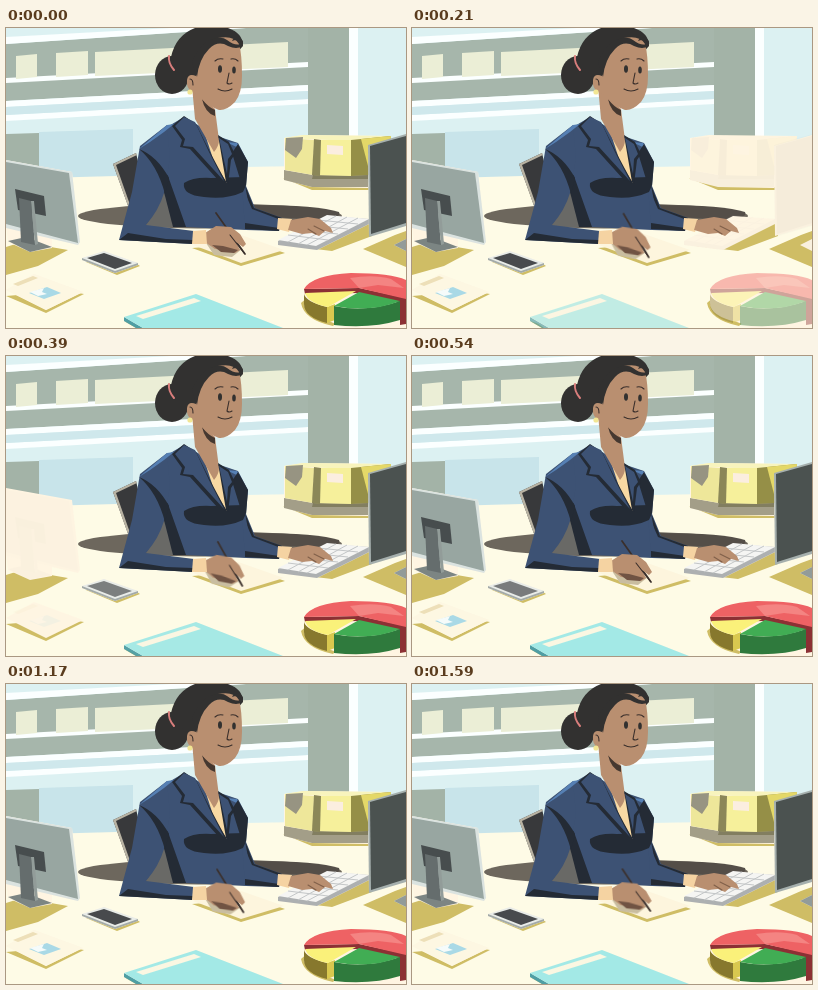
An HTML page for the animation above (1620 ms loop, 400 by 300 pixels).

```html
<!DOCTYPE html>
<html lang="en">
<head>
<meta charset="utf-8">
<title>At the desk</title>
<style>
  html, body { margin: 0; width: 100%; height: 100%; overflow: hidden; background: #fefbe6; }
  svg { display: block; width: 100vw; height: 100vh; }

  /* each desk object pales to cream once per loop, from right to left */
  .fade { animation: fade 1620ms linear var(--at) infinite; }
  @keyframes fade {
    0%, 13.58%, 100% { opacity: 1; }
    6.79% { opacity: 0; }
  }

  .write { transform-origin: 202px 203px; animation: write 270ms infinite; }
  @keyframes write {
    0%, 11.1% { transform: rotate(0deg); animation-timing-function: ease-in-out; }
    55.6%, 66.7% { transform: rotate(7deg); animation-timing-function: ease-in-out; }
    100% { transform: rotate(0deg); }
  }

  .cream { fill: #fff5e2; }
  .shade { fill: #cfbd65; }
  .navy { fill: #3d5274; }
  .ink { fill: #242b35; }
  .skin { fill: #b98f70; }
  .hair { fill: #323130; }
  .line { fill: none; stroke: #3a2f2b; stroke-width: 1.1; stroke-linecap: round; }
</style>
</head>
<body>
<svg viewBox="0 0 400 300" preserveAspectRatio="none">
  <g id="room">
    <path fill="#dcf1f2" d="M0 0H400V160H0Z"/>
    <path fill="#a6b6ab" d="M0 16 240 0H302V57L0 73Z"/>
    <path fill="#fbffff" d="M0 9 165 0H240L0 16ZM0 50 302 34V39L0 55Z"/>
    <path fill="#fbffff" d="M0 73 302 57V63L0 79ZM0 87 302 71V76L0 93Z"/>
    <path fill="#cfe8ec" d="M0 79 302 63V71L0 87Z"/>
    <path fill="#ebeed6" d="M10 28 31 26V49L10 51ZM50 25 82 23V47L50 49ZM89 24 282 14V39L89 48Z"/>
    <path fill="#a3b3a7" d="M0 106 33 105V150H0Z"/>
    <path fill="#c8e4ea" d="M33 104 127 101V152H33Z"/>
    <path fill="#a3b3a7" d="M302 0H343V112H302Z"/>
    <path fill="#fbffff" d="M343 0H352V112H343Z"/>
  </g>

  <path fill="#fefbe6" d="M0 151 110 148 240 139 400 136V300H0Z"/>
  <ellipse cx="204" cy="188" rx="132" ry="12.5" fill="#6d675d"/>
  <path fill="#544e48" d="M230 177Q310 176 333 184Q336 190 316 192L230 187Z"/>

  <g id="shadows" class="shade">
    <path d="M0 219 16 214 62 222 32 238 0 247Z"/>
    <path d="M0 268 40 285 78 266 60 263Z"/>
    <path d="M186 220 235 238 279 225 250 215Z"/>
    <path d="M284 218 326 223 366 208V193L311 219Z"/>
    <path d="M357 221 389 207 400 203V239Z"/>
    <path d="M277 150 306 162 364 162 369 155Z"/>
    <path d="M295 275Q298 292 327 298L340 285 310 262Z"/>
  </g>

  <g id="boxes">
    <path class="cream" d="M278 110 297 107 385 108 383 143 362 160 306 159 278 152Z"/>
    <g class="fade" style="--at:108ms">
      <path fill="#a39e88" d="M278 142 307 147 362 147V159L306 159 278 152Z"/>
      <path fill="#827e60" d="M307 147 345 148 362 147V151L306 151Z"/>
      <path fill="#f8f4bd" d="M278 110 297 107 385 108 345 113Z"/>
      <path fill="#eee79a" d="M279 110 308 112 307 147 279 142Z"/>
      <path fill="#f6f09b" d="M308 112 345 112V148L307 147Z"/>
      <path fill="#958f47" d="M345 112 385 108 383 143 362 147 345 148Z"/>
      <path fill="#e4d868" d="M355 111 385 108 383 135 362 138Z"/>
      <path fill="#8b8758" d="M308 111 315 112 314 148 306 147Z"/>
      <path fill="#979482" d="M280 110 297 109 296 121 290 130 279 122Z"/>
      <path fill="#fbeee0" d="M321 117 337 118V127L321 126Z"/>
    </g>
  </g>

  <g id="chair">
    <path fill="#38393b" d="M107 136 130 125 146 192 130 200Q120 172 107 136Z"/>
    <path fill="#b9b3a3" d="M107 136 130 125 131 127 110 137 129 191 127 192Q117 164 107 136Z"/>
  </g>

  <g id="woman">
    <path fill="#696966" d="M159 160 170 199 139 200Z"/>
    <path class="ink" d="M152 138 172 140 184 199 167 199 158 164Z"/>
    <path class="navy" d="M161 99 178 89 211 108 232 115 242 134 240 158 249 180 276 190 273 203 240 202 180 199 162 148 140 118Z"/>
    <path class="navy" d="M161 97 134 118 126 164 113 212 187 216 188 203 140 197Q153 182 158 165L164 130Z"/>
    <path fill="#5680b4" d="M133 121 161 97 168 96 158 104 144 114ZM220 114 231 115 235 121Z"/>
    <path class="ink" d="M133 121Q151 128 163 150L159 166Q151 136 133 121Z"/>
    <path class="ink" d="M113 212 122 205 160 211 187 212V216ZM232 116 242 134 240 158 234 151 226 125ZM239 157 248 180 276 190 275 194 244 184Z"/>
    <path class="navy" d="M236 158 246 181 275 192 273 203 239 200Z"/>
    <path class="ink" d="M239 195 273 200V203L239 201ZM178 155Q187 149 205 150L238 149Q242 155 237 164Q220 172 198 169Q176 167 178 155Z"/>
    <path fill="#f8d9a3" d="M199 106 213 110 219 122 221 155 208 134Z"/>
    <path class="skin" d="M186 58 189 91 200 110 208 124Q213 118 213 112L209 81Z"/>
    <path fill="#453830" d="M196 71Q202 79 209 82L209 88Q199 85 196 71Z"/>
    <path class="ink" d="M178 88 166 98 176 112 174 119 184 121 212 152 221 156 205 126 190 96Z"/>
    <path class="navy" d="M178 89 169 98 179 111 177 118 187 119 218 153 203 124 189 94Z"/>
    <path class="ink" d="M212 107 223 114 229 126 225 132 222 156 220 154Z"/>
    <path class="navy" d="M213 110 222 116 226 126 222 131 221 146Z"/>

    <ellipse class="hair" cx="166" cy="47" rx="17" ry="19"/>
    <path class="hair" d="M165 29Q170 7 189 0H222Q237 5 237 18L204 55 186 57Q176 44 165 29Z"/>
    <path class="skin" d="M192 40Q198 17 212 10Q228 7 233 16Q236 26 236 48Q236 65 229 74Q220 83 213 82Q202 78 193 68L186 64Q180 60 181 52Q182 45 190 48Z"/>
    <path class="hair" d="M186 34Q196 12 207 11Q216 8 221 12Q229 18 234 16Q236 13 231 12Q228 12 226 13Q228 8 234 10Q239 13 236 18Q231 22 222 18Q212 12 203 21Q193 31 191 49Z"/>
    <path class="line" style="stroke:#d97e7c;stroke-width:2" d="M163 28Q162 35 168 42"/>
    <path class="line" d="M184 51Q187 51 187 57M209 33Q212 30 217 31M225 31Q229 30 232 33M223 45 221 55Q223 57 226 55M212 61Q219 65 226 61"/>
    <g class="hair">
      <ellipse cx="214" cy="41" rx="2" ry="3.7"/>
      <ellipse cx="228" cy="42" rx="1.8" ry="3.6"/>
    </g>
    <circle cx="184" cy="64" r="2.6" fill="#f2e693"/>
  </g>

  <g id="keyboard">
    <path class="cream" d="M272 213 321 188 363 191V196L311 222 272 217Z"/>
    <g class="fade" style="--at:95ms">
      <path fill="#adb0b1" d="M272 213 321 188 363 191V196L311 222 272 217Z"/>
      <path fill="#f5f5f3" d="M272 212 321 187 363 191 310 218Z"/>
      <path fill="none" stroke="#c3c6c7" d="M282 207 322 212M292 202 332 206M302 197 342 201M312 192 352 196M282 214 330 188M292 216 341 189M301 217 352 190"/>
    </g>
  </g>
  <path fill="#f5d3a2" d="M272 190 286 191 283 204 271 201Z"/>
  <path class="skin" d="M285 192 302 189 314 191 325 200 327 205 319 203 313 208 306 205 296 206 282 202Z"/>
  <path class="line" style="stroke:#80604a" d="M308 198 318 203M302 201 310 206"/>

  <path fill="#fdf5dd" d="M187 217 218 201 278 222 235 235Z"/>
  <g class="write">
    <path fill="#c9bda0" d="M200 215 236 221 226 229 208 227Z"/>
    <path class="line" style="stroke-width:1.7" d="M210 185 239 226"/>
    <path class="skin" d="M199 205 210 198 225 199 234 206 240 216 237 219 230 214 234 222 229 225 219 222 209 221 199 214Z"/>
    <path fill="#705343" d="M206 217 217 218 232 222 228 225 215 224Z"/>
    <path class="line" d="M224 207 238 225"/>
  </g>
  <path fill="#f5d3a2" d="M187 203 200 202 201 216 186 216Z"/>

  <g id="screen-right">
    <path class="cream" d="M362 118 400 107V197L363 208ZM388 217 400 211V223Z"/>
    <g class="fade" style="--at:95ms">
      <path fill="#a5afad" d="M362 117 400 106V198L363 209Z"/>
      <path fill="#4b5250" d="M364 118 400 108V195L365 206Z"/>
      <path fill="#929b99" d="M388 217 400 211V223Z"/>
    </g>
  </g>

  <g id="screen-left">
    <path class="cream" d="M0 132 66 144 74 214 72 217 46 211V220L24 224 2 214 0 196Z"/>
    <g class="fade" style="--at:278ms">
      <path fill="#dbe3e0" d="M0 132 66 144 74 214 72 217 0 200Z"/>
      <path fill="#98a6a1" d="M0 134 63 145 72 215 0 196Z"/>
      <path fill="#7c8583" d="M2 213 20 209 46 219 24 224Z"/>
      <path fill="#474d4e" d="M9 161 38 168 40 188 12 182Z"/>
      <path fill="#656d6d" d="M13 170 25 173 29 217 15 214Z"/>
      <path fill="#929c99" d="M25 173 28 173 32 216 29 217Z"/>
    </g>
  </g>

  <g id="letter">
    <path class="cream" d="M0 262 28 246 77 264 40 282Z"/>
    <g class="fade" style="--at:295ms">
      <path fill="#fdf7e2" d="M0 262 28 246 77 264 40 282Z"/>
      <path fill="#eddfb8" d="M7 256 27 248 32 250 12 258Z"/>
      <path fill="#a9d9e6" d="M23 265 41 259 55 265 38 271Z"/>
      <path fill="#f5fbfa" d="M24 264 38 260 36 264 41 266 32 268Z"/>
    </g>
  </g>

  <g id="phone">
    <path class="shade" d="M80 234 111 247 134 238 128 234Z"/>
    <path class="cream" d="M76 230 98 223 132 235V237L109 245 76 232Z"/>
    <path fill="#a3aaa8" d="M76 230 132 235V237L109 245 76 232Z"/>
    <path fill="#e9ece8" d="M76 230 98 223 132 235 109 243Z"/>
    <path class="fade" style="--at:355ms" fill="#484a4d" d="M81 230 98 225 126 235 109 241Z"/>
  </g>

  <g id="folder">
    <path class="shade" d="M118 293 130 300H140Z"/>
    <path class="cream" d="M118 290 190 266 277 300H132Z"/>
    <g class="fade" style="--at:175ms">
      <path fill="#4f9ea4" d="M118 289 137 300H130L118 293Z"/>
      <path fill="#a3e9e6" d="M118 289 190 266 277 300H137Z"/>
      <path fill="#fbf7e2" d="M130 288 188 270 195 273 137 291Z"/>
    </g>
  </g>

  <g id="pie">
    <path class="cream" d="M298 262Q306 246 350 246Q385 245 400 253V300H340L325 294Q298 288 298 275Z"/>
    <g class="fade" style="--at:146ms">
      <path fill="#8c3034" d="M298 261 353 260 400 270V296L394 297V275L353 265 299 266Z"/>
      <path fill="#ee6264" d="M298 261Q306 247 345 245Q385 245 400 252V271L353 260Z"/>
      <path fill="#f48482" d="M344 250Q368 246 385 251L398 260 372 257 353 260Z"/>
      <path fill="#87782d" d="M298 266Q300 274 321 279V295Q298 289 298 276Z"/>
      <path fill="#d9c84f" d="M321 279 329 276V292L321 295Z"/>
      <path fill="#faf17a" d="M299 265 350 263 322 279Q302 275 299 265Z"/>
      <path fill="#2f7a3d" d="M328 278Q360 285 394 273V292Q365 301 328 297Z"/>
      <path fill="#41ad54" d="M328 278 353 264 394 273Q365 285 328 278Z"/>
    </g>
  </g>
</svg>
</body>
</html>
```
